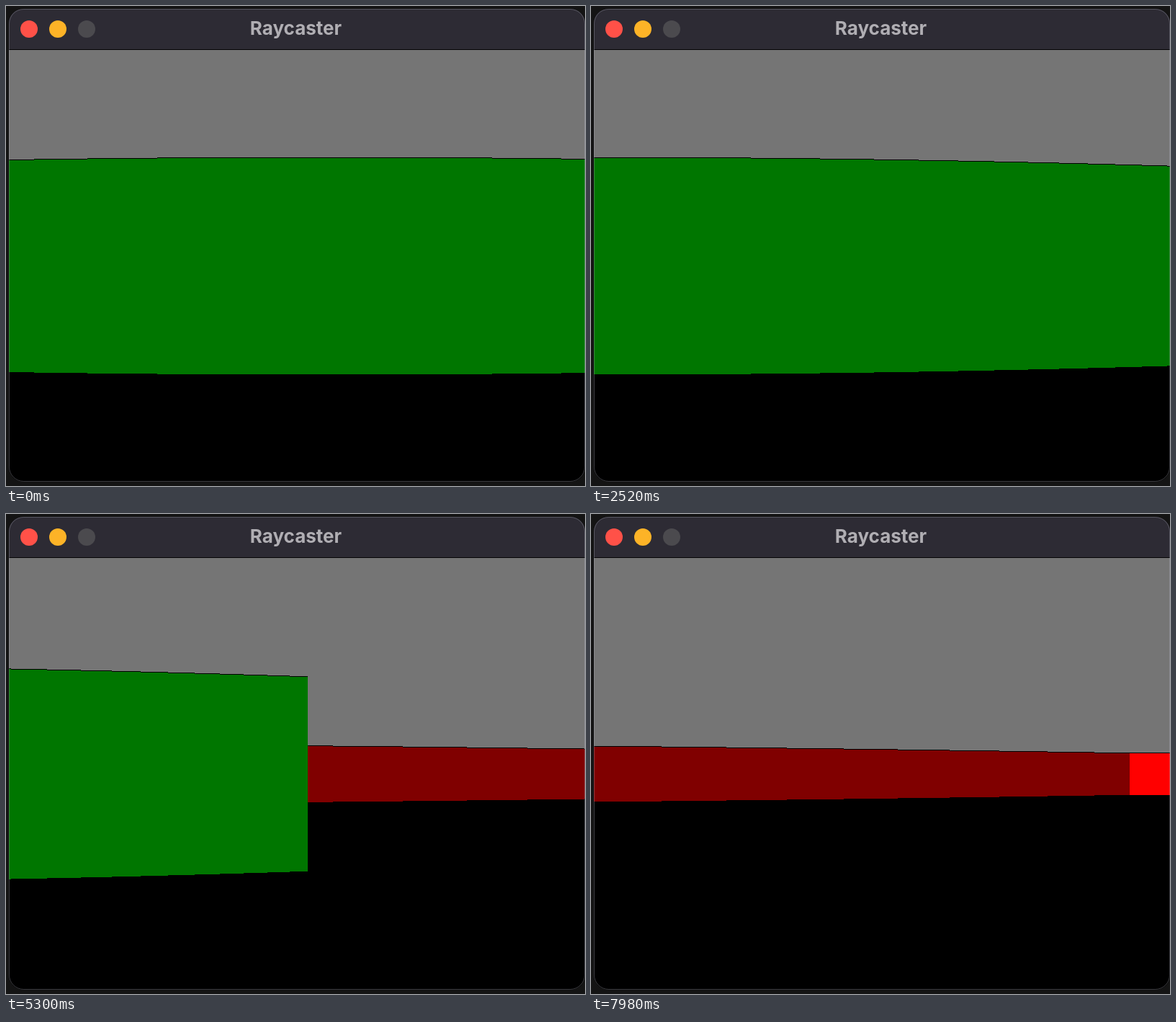
Write an HTML page with a canvas that moves like this. It is 804 by 666 pixels and loops after 8000 ms.

```html
<!DOCTYPE html>
<html lang="en">
<head>
<meta charset="utf-8">
<title>Raycaster</title>
<style>
  html, body { margin: 0; width: 100%; height: 100%; overflow: hidden; background: #141414; }
  canvas { display: block; width: 804px; height: 666px; }
</style>
</head>
<body>
<canvas id="stage" width="804" height="666"></canvas>
<script>
const ctx = document.getElementById('stage').getContext('2d');

const LOOP = 8000;
const LEFT = 4, RIGHT = 804;
const HORIZON = 361;
const FOCAL = 2012;          // pixels per radian
const TURN = 0.025 * FOCAL;  // pixels per turn of the view
const FACING = 442.2;        // where the near wall is met head-on at the start

// The room in map units: wall depths ahead, and where each wall ends to the right.
const WALL = 300;
const NEAR = 2, FAR = 7, SIDE = 8;
const NEAR_END = Math.atan2(1, NEAR), FAR_END = Math.atan2(SIDE, FAR);

function rect(color, x, y, w, h) {
  ctx.fillStyle = color;
  ctx.fillRect(x, y, w, h);
}

function dot(color, x) {
  ctx.fillStyle = color;
  ctx.beginPath();
  ctx.arc(x, 32, 12, 0, Math.PI * 2);
  ctx.fill();
}

function windowPath(inset) {
  ctx.beginPath();
  ctx.roundRect(4 + inset, 4 + inset, 800 - 2 * inset, 656 - 2 * inset, 20);
}

// Pictures come in threes, held 20, 100 and 20 ms; the view turns about every six.
function turnsAt(time) {
  const rest = time % 140;
  const picture = 3 * Math.floor(time / 140) + (rest < 20 ? 0 : rest < 120 ? 1 : 2);
  return Math.floor((picture + 2.1) / 6.05);
}

function wallAt(angle) {
  if (angle < NEAR_END) return { color: '#007600', half: WALL / NEAR * Math.cos(angle) };
  if (angle < FAR_END) return { color: '#800000', half: WALL / FAR * Math.cos(angle) };
  return { color: '#ff0000', half: WALL / SIDE * Math.sin(angle) };
}

function drawWalls(turns) {
  const center = FACING - TURN * turns;
  for (let x = LEFT; x < RIGHT; x++) {
    const wall = wallAt((x + 0.5 - center) / FOCAL);
    const half = Math.ceil(wall.half);
    rect('#000', x, HORIZON - half - 1, 1, 1);
    rect(wall.color, x, HORIZON - half, 1, 2 * half);
  }
}

function drawTitleBar() {
  rect('#2d2b34', LEFT, 4, 800, 56);
  rect('#050506', LEFT, 60, 800, 1);
  dot('#ff5148', 32);
  dot('#fdb327', 72);
  dot('#4b4a4e', 112);
  ctx.fillStyle = '#b0aeb3';
  ctx.font = '700 26px Inter, sans-serif';
  ctx.textAlign = 'center';
  ctx.fillText('Raycaster', 402.5, 40);
}

function draw(time) {
  rect('#141414', 0, 0, 804, 666);
  ctx.save();
  windowPath(0);
  ctx.clip();
  rect('#757575', LEFT, 61, 800, 300);
  rect('#000', LEFT, HORIZON, 800, 300);
  drawWalls(turnsAt(time));
  drawTitleBar();
  ctx.restore();
  windowPath(0.5);
  ctx.lineWidth = 1;
  ctx.strokeStyle = 'rgba(190, 188, 205, 0.3)';
  ctx.stroke();
}

function tick() {
  draw(performance.now() % LOOP);
  requestAnimationFrame(tick);
}
tick();
</script>
</body>
</html>
```
